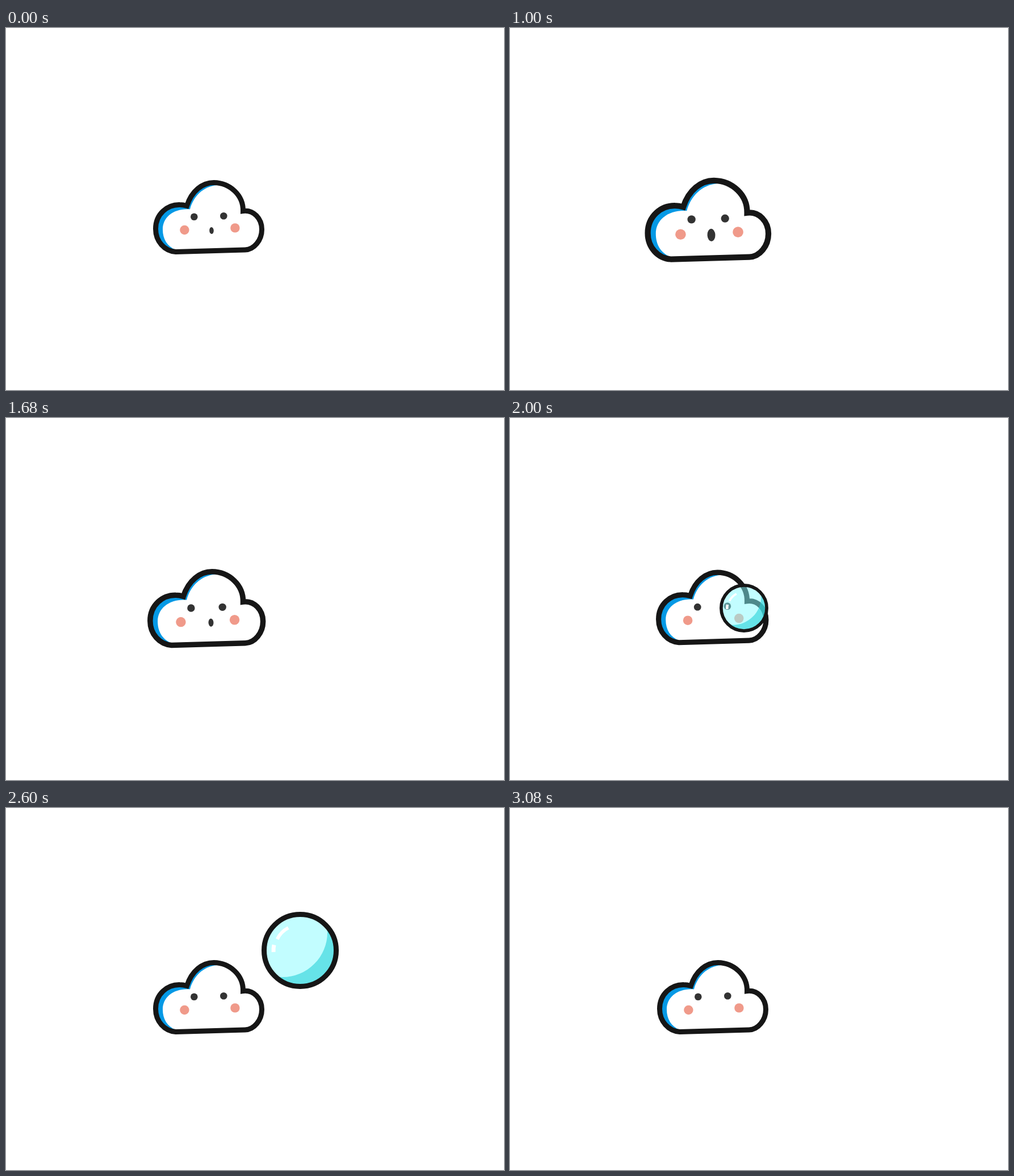
Animation, 877 px wide and 638 px high, one loop 3560 ms. Source, as an HTML page with a canvas:

```html
<!DOCTYPE html>
<html lang="en">
<head>
<meta charset="utf-8">
<title>Cloud blowing a bubble</title>
<style>
html, body { margin: 0; width: 100%; height: 100%; overflow: hidden; background: #fff; }
canvas { display: block; }
</style>
</head>
<body>
<canvas id="stage" width="877" height="638"></canvas>
<script>
const ctx = document.getElementById('stage').getContext('2d');
const LOOP = 3560, STEP = 40, INK = '#161616', TAU = Math.PI * 2;

const rightSide = 'C395 273 418 295 417.5 322.5 C436 320 450.5 336 450.5 355 C450.5 374 437 390.5 421 391 Z';
const body = new Path2D('M299 394.5 C279 393 263.5 376 263.5 354 C263.5 328 284 311 306 311.5' +
  ' Q312 311.5 318.5 313.5 C327 287 346 272.5 366 272.5 ' + rightSide);
const light = new Path2D('M299 391 C284 385 276 372 276 355 C276 333 296 317.5 324 319.5' +
  ' C330 297 347 279 372 277 ' + rightSide);

// Linear interpolation through [time, value] keys
function track(t, keys) {
  if (t <= keys[0][0]) return keys[0][1];
  for (let i = 1; i < keys.length; i++) {
    const [t0, a] = keys[i - 1], [t1, b] = keys[i];
    if (t <= t1) return a + (b - a) * (t - t0) / (t1 - t0);
  }
  return keys[keys.length - 1][1];
}

function oval(x, y, rx, ry, color, tilt = 0) {
  ctx.beginPath();
  ctx.ellipse(x, y, rx, ry, tilt, 0, TAU);
  ctx.fillStyle = color;
  ctx.fill();
}

function arc(r, from, to, width, color) {
  ctx.beginPath();
  ctx.arc(0, 0, r, from, to);
  ctx.lineWidth = width;
  ctx.strokeStyle = color;
  ctx.stroke();
}

function drawCloud(t) {
  const puff = 1 + track(t, [[640, 0], [1240, .227], [1360, .179], [1760, .034], [2140, 0]]);
  ctx.save();
  ctx.translate(417, 299);
  ctx.scale(puff, puff);
  ctx.translate(-417, -299);
  ctx.fillStyle = '#0599e5';
  ctx.fill(body);
  ctx.fillStyle = '#fff';
  ctx.fill(light);
  ctx.lineWidth = 9;
  ctx.strokeStyle = INK;
  ctx.stroke(body);

  const open = t === 40 ? .5 : t === 80 ? .15 : 1;
  oval(331.3, 332.8, 6.3, 6.3 * open, '#333');
  oval(383.3, 331.3, 6.3, 6.3 * open, '#333');
  oval(314.4, 356, 8.2, 8.2, '#f09a8a');
  oval(403.4, 352.4, 8.2, 8.2, '#f09a8a');
  if (t < 1800) {
    const grow = track(t, [[640, 1], [1000, 1.62], [1360, 1.57], [1760, 1]]);
    const x = track(t, [[1000, 362], [1360, 364.3]]);
    oval(x, 357, 3.8 * grow, 6 * grow, '#333', -.04);
  }
  ctx.restore();
}

function drawBubble(t) {
  const u = Math.min(1, Math.max(0, (t - 2600) / 280));
  const drift = 1 - (1 - u) ** 3;
  const x = track(t, [[1760, 372], [2000, 412], [2280, 455], [2320, 463], [2600, 518]]) + 13 * drift;
  const y = track(t, [[1760, 358], [2000, 335], [2280, 303], [2320, 296.5], [2600, 251]]) - 19 * drift;
  const size = track(t, [[1760, 0], [2140, 1]]);
  ctx.save();
  ctx.translate(x, y);
  ctx.scale(size, size);
  oval(0, 0, 60, 60, 'rgba(133,251,255,.5)');

  // Shaded rim: inner disc minus a larger offset disc
  ctx.save();
  ctx.beginPath();
  ctx.arc(0, 0, 60, 0, TAU);
  ctx.clip();
  ctx.beginPath();
  ctx.rect(-70, -70, 140, 140);
  ctx.moveTo(48, -32);
  ctx.arc(-31, -32, 79, 0, TAU);
  ctx.fillStyle = 'rgba(41,210,217,.6)';
  ctx.fill('evenodd');
  ctx.restore();

  arc(45, 3.6, 4.23, 6, '#fff');
  arc(47, 3.08, 3.35, 7, '#fff');
  arc(63.5, 0, TAU, 9, INK);
  ctx.restore();
}

function drawPop(t) {
  const u = (t - 2880) / 160;
  ctx.save();
  ctx.translate(533.5, 222);
  ctx.scale(1, .91);
  ctx.lineCap = 'round';
  ctx.lineWidth = 7 - 4 * u;
  ctx.strokeStyle = INK;
  ctx.beginPath();
  for (let i = 0; i < 12; i++) {
    const a = i * TAU / 12, inner = 62 + 32 * u, outer = 80 + 20 * u;
    ctx.moveTo(inner * Math.cos(a), inner * Math.sin(a));
    ctx.lineTo(outer * Math.cos(a), outer * Math.sin(a));
  }
  ctx.stroke();
  ctx.restore();
}

const start = performance.now();
function frame() {
  const t = Math.floor((performance.now() - start) % LOOP / STEP) * STEP;
  ctx.clearRect(0, 0, 877, 638);
  drawCloud(t);
  if (t >= 1800 && t <= 2880) drawBubble(t);
  else if (t > 2880 && t < 3080) drawPop(t);
  requestAnimationFrame(frame);
}
frame();
</script>
</body>
</html>
```
